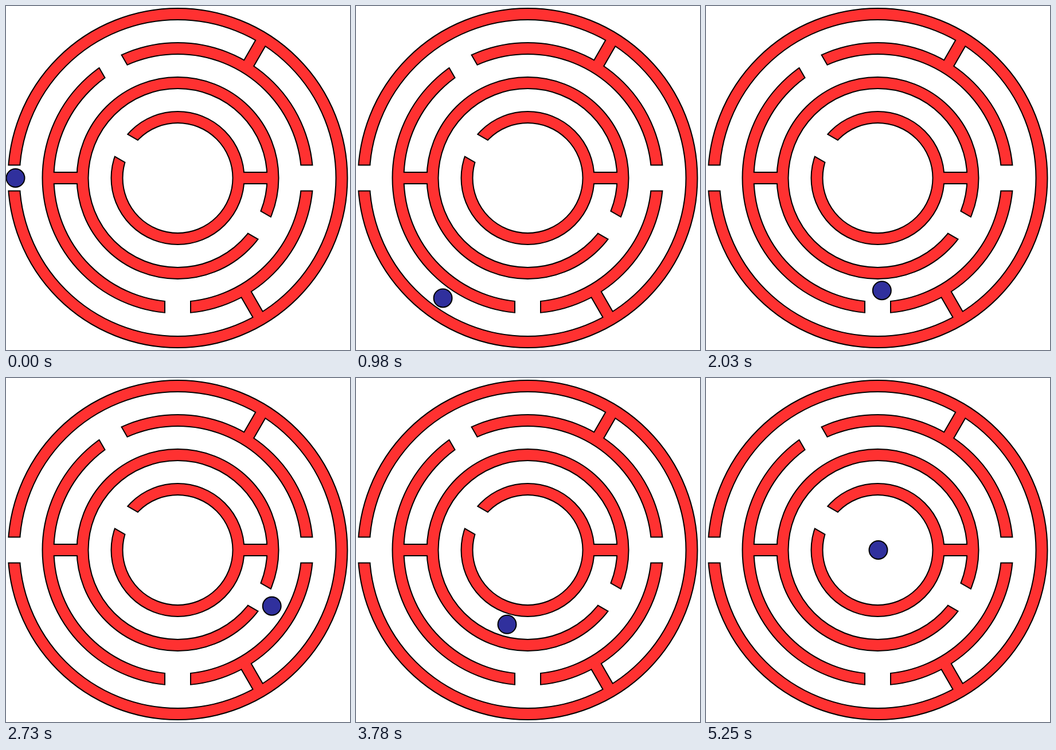
Write an HTML page with a canvas that moves like this. It is 600 px wide and 600 px high and loops after 5.95 s.

```html
<!DOCTYPE html>
<html lang="en">
<head>
<meta charset="utf-8">
<title>Circular maze</title>
<style>
html, body { margin: 0; width: 100%; height: 100%; overflow: hidden; background: #fff; }
canvas { display: block; width: 600px; height: 600px; }
</style>
</head>
<body>
<canvas id="stage" width="600" height="600"></canvas>
<script>
const SIZE = 600, STEP = 70, LAST = 75, LOOP = 5950;
const RED = '#ff3131', BLUE = '#30309d';
const rad = deg => deg * Math.PI / 180;

const ringRadius = i => 106 + 60 * i;

// Each gap lies on one ring, each spoke joins a ring to the next one out
const gaps = [
  { ring: 3, angle: 180 },
  { ring: 2, angle: 0 }, { ring: 2, angle: 90 }, { ring: 2, angle: 240 },
  { ring: 1, angle: 30 },
  { ring: 0, angle: 210 }
];
const spokes = [
  { ring: 2, angle: -60, shift: 7.4 },
  { ring: 2, angle: 60, shift: -2 },
  { ring: 1, angle: 180, shift: 0 },
  { ring: 0, angle: 0, shift: 0 }
];

// The ball rolls inwards through a gap, then round a corridor, and so on
const inward = [
  { to: 257, from: 0, until: 9 },
  { to: 196.3, from: 20.5, until: 27.7 },
  { to: 135, from: 37.5, until: 45.2 },
  { to: 0, from: 65.3, until: 75 }
];
const around = [
  { to: 90, from: 5.6, until: 20.3 },
  { to: 28.3, from: 24.6, until: 40.1, power: 1.8 },
  { to: 210.8, from: 45, until: 65 }
];

function makeCanvas() {
  const canvas = document.createElement('canvas');
  canvas.width = canvas.height = SIZE;
  return canvas;
}

function rotated(g, angle, paint) {
  g.save();
  g.rotate(rad(angle));
  paint();
  g.restore();
}

// Walls grown (or shrunk) by `grow` pixels on every side
function wallLayer(color, grow) {
  const canvas = makeCanvas(), g = canvas.getContext('2d');
  const half = 10 + grow, gapHalf = 22.5 - grow;
  g.translate(299.5, 300);
  g.strokeStyle = g.fillStyle = color;
  g.lineWidth = 2 * half;
  for (let i = 0; i < 4; i++) {
    g.beginPath();
    g.arc(0, 0, ringRadius(i), 0, 2 * Math.PI);
    g.stroke();
  }
  for (const { ring, angle, shift } of spokes) {
    rotated(g, angle, () => g.fillRect(ringRadius(ring), shift - half, 60, 2 * half));
  }
  g.globalCompositeOperation = 'destination-out';
  for (const { ring, angle } of gaps) {
    rotated(g, angle, () => g.fillRect(ringRadius(ring) - 16, -gapHalf, 32, 2 * gapHalf));
  }
  return canvas;
}

const maze = makeCanvas();
const mazeContext = maze.getContext('2d');
mazeContext.fillStyle = '#fff';
mazeContext.fillRect(0, 0, SIZE, SIZE);
mazeContext.drawImage(wallLayer('#000', 1), 0, 0);
mazeContext.drawImage(wallLayer(RED, -1), 0, 0);

// Eases a value through its legs one after another
function follow(value, legs, step) {
  for (const { to, from, until, power = 1 } of legs) {
    const progress = Math.min(1, Math.max(0, (step - from) / (until - from)));
    const u = progress ** power;
    value += (to - value) * u * u * (3 - 2 * u);
  }
  return value;
}

const ctx = document.getElementById('stage').getContext('2d');

function draw(time) {
  const step = Math.min(LAST, Math.floor(time % LOOP / STEP));
  const r = follow(284, inward, step);
  const angle = rad(follow(180, around, step));
  ctx.drawImage(maze, 0, 0);
  ctx.beginPath();
  ctx.arc(300.5 + r * Math.cos(angle), 300 + r * Math.sin(angle), 16, 0, 2 * Math.PI);
  ctx.fillStyle = BLUE;
  ctx.fill();
  ctx.lineWidth = 2;
  ctx.strokeStyle = '#000';
  ctx.stroke();
}

const start = performance.now();
function tick() {
  draw(performance.now() - start);
  requestAnimationFrame(tick);
}
tick();
</script>
</body>
</html>
```
